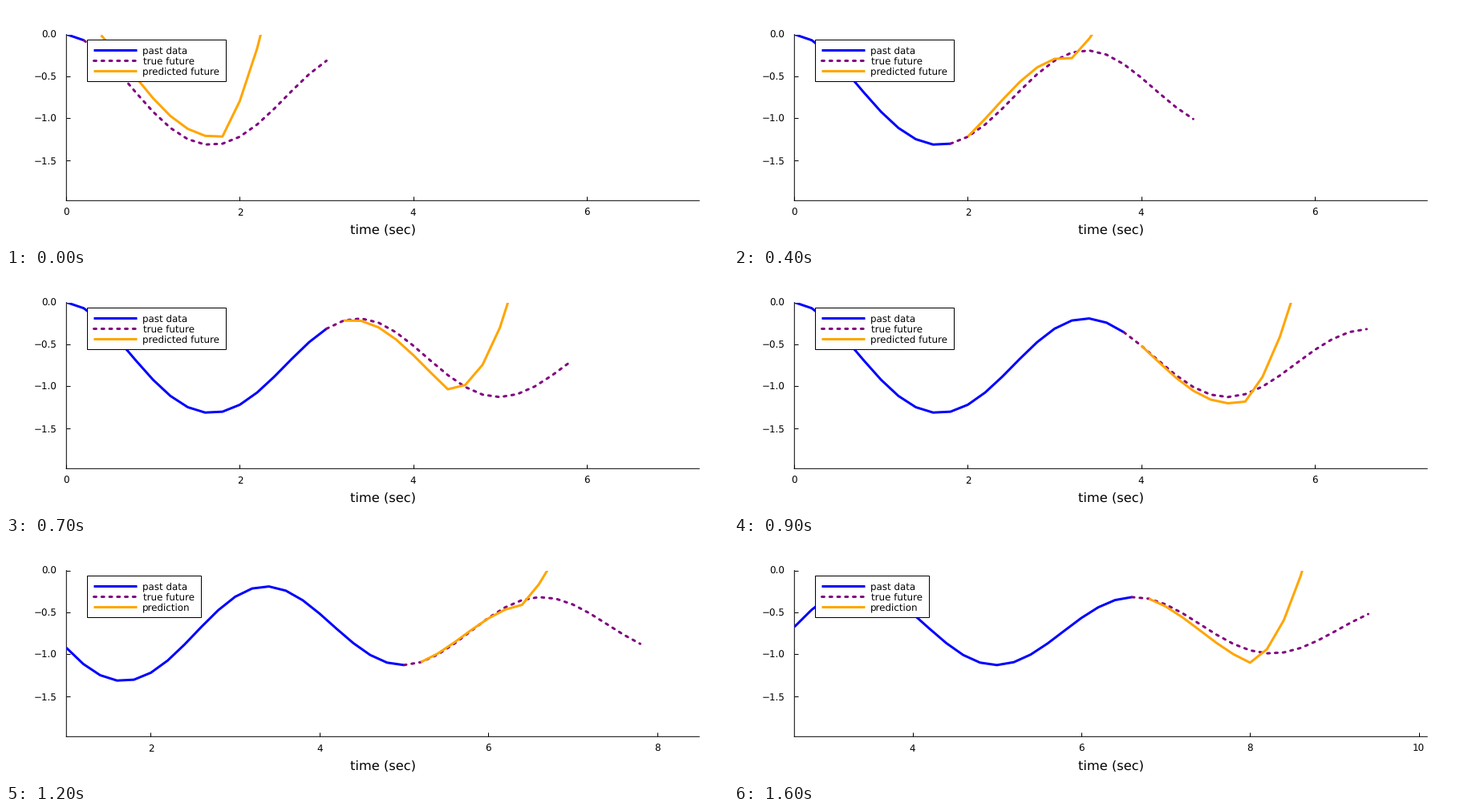
Write a matplotlib script that moves like this. It is 900 px wide and 300 px high and loops after 1700 ms.

```python
import numpy as np
import matplotlib.pyplot as plt
from matplotlib.animation import FuncAnimation
from matplotlib.patches import Rectangle

W, H = 900, 300
PX = 0.72  # points per pixel at 100 dpi
STEP = 0.2
FRAMES = 17
WINDOW = 4    # seconds of past kept in view
HORIZON = 14  # steps of future shown

plt.rcParams.update({
    "font.family": "DejaVu Sans",
    "font.size": 11.85 * PX,
    "text.hinting": "none",
    "axes.linewidth": PX,
})


def phase(t):
    return 1.925 * t - 0.24 + 0.26 * np.exp(-(t / 1.7) ** 3)


def signal(t):
    """Damped oscillation around a slowly rising rest level."""
    rest = 0.005 * t - 0.718
    return rest + 0.72 * np.exp(-0.101 * t) * np.cos(phase(t))


def forecast_error(now, s):
    """Error after s steps: slow drift at first, runaway growth after six."""
    swing = phase(now)
    drift = (-0.1 + 0.07 * np.cos(swing - 2.2)) * s / 6
    bulge = 0.3 * np.exp(-now / 2.4) * max(0, -np.cos(swing))
    early = 0.4 * np.exp(-3 * now) * (s <= 6)  # little history to learn from
    late = np.maximum(s - 6, 0)
    runaway = 0.15 * late + 0.07 * late ** 2
    return drift + bulge * np.maximum(s * (6 - s), 0) / 9 + early + runaway


def ticks_between(lo, hi):
    """Even numbers, or every integer if fewer than four would fit."""
    for gap in (2, 1):
        ticks = np.arange(np.ceil(lo / gap) * gap, hi, gap)
        if len(ticks) >= 4:
            break
    return ticks


styles = [
    dict(color="blue"),
    dict(color="purple", linestyle=(0, (1, 2.25)), dash_capstyle="round"),
    dict(color="orange"),
]
common = dict(linewidth=3 * PX, solid_capstyle="butt",
              solid_joinstyle="round", snap=False)

fig = plt.figure(figsize=(W / 100, H / 100), dpi=100, facecolor="white")

# Plot area
left, right, top, bottom = 75.3, 864.2, 35.6, 243.3
ax = fig.add_axes([left / W, 1 - bottom / H,
                   (right - left) / W, (bottom - top) / H])
ax.spines[["top", "right"]].set_visible(False)
for side in ("left", "bottom"):
    ax.spines[side].set_snap(False)
ax.set_ylim(-1.98, 0)
levels = np.arange(0, -2, -0.5)
ax.set_yticks(levels, [f"{v:.1f}".replace("-", "\u2212") for v in levels])
ax.tick_params(direction="in", length=5 * PX, width=PX)
ax.tick_params(axis="x", pad=9.5 * PX)
ax.tick_params(axis="y", pad=12.2 * PX)
past, future, forecast = [
    ax.plot([], [], zorder=3, **s, **common)[0] for s in styles]

# Overlay in pixel coordinates for the legend and the axis title
stage = fig.add_axes([0, 0, 1, 1], zorder=2)
stage.set_xlim(0, W)
stage.set_ylim(H, 0)
stage.axis("off")
stage.text(470.3, 284.4, "time (sec)", fontsize=16.25 * PX, ha="center",
           va="baseline")
box = stage.add_patch(Rectangle((101.5, 42.5), 173, 52, facecolor="white",
                                edgecolor="black", linewidth=PX, snap=False))
labels = []
rows = zip(styles, ["past data", "true future", "predicted future"],
           [170, 171, 170])
for n, (style, name, x) in enumerate(rows):
    y = 55.5 + 13 * n
    stage.plot([109.5, 163.5], [y, y], **style, **common)
    labels.append(stage.text(x, y + 4.5, name, va="baseline"))


def trace(line, first, last):
    t = np.arange(first, last + 1) * STEP
    line.set_data(t, signal(t))


def draw(k):
    i = 2 * k + 1
    now = i * STEP
    start = max(0, i - round(WINDOW / STEP))
    trace(past, start, i)
    trace(future, i, i + HORIZON)

    s = np.arange(11)
    t = now + (s + 1) * STEP
    forecast.set_data(t, signal(t) + forecast_error(now, s))

    lo, hi = start * STEP, max(7.3, now + 3.5)
    ticks = ticks_between(lo, hi)
    ax.set_xticks(ticks, [f"{v:.0f}" for v in ticks])
    ax.set_xlim(lo, hi)

    scrolling = start > 0
    labels[2].set_text("prediction" if scrolling else "predicted future")
    box.set_width(142 if scrolling else 173)
    return past, future, forecast


anim = FuncAnimation(fig, draw, frames=FRAMES, interval=100, repeat=True,
                     repeat_delay=0, blit=False)
plt.show()
```
